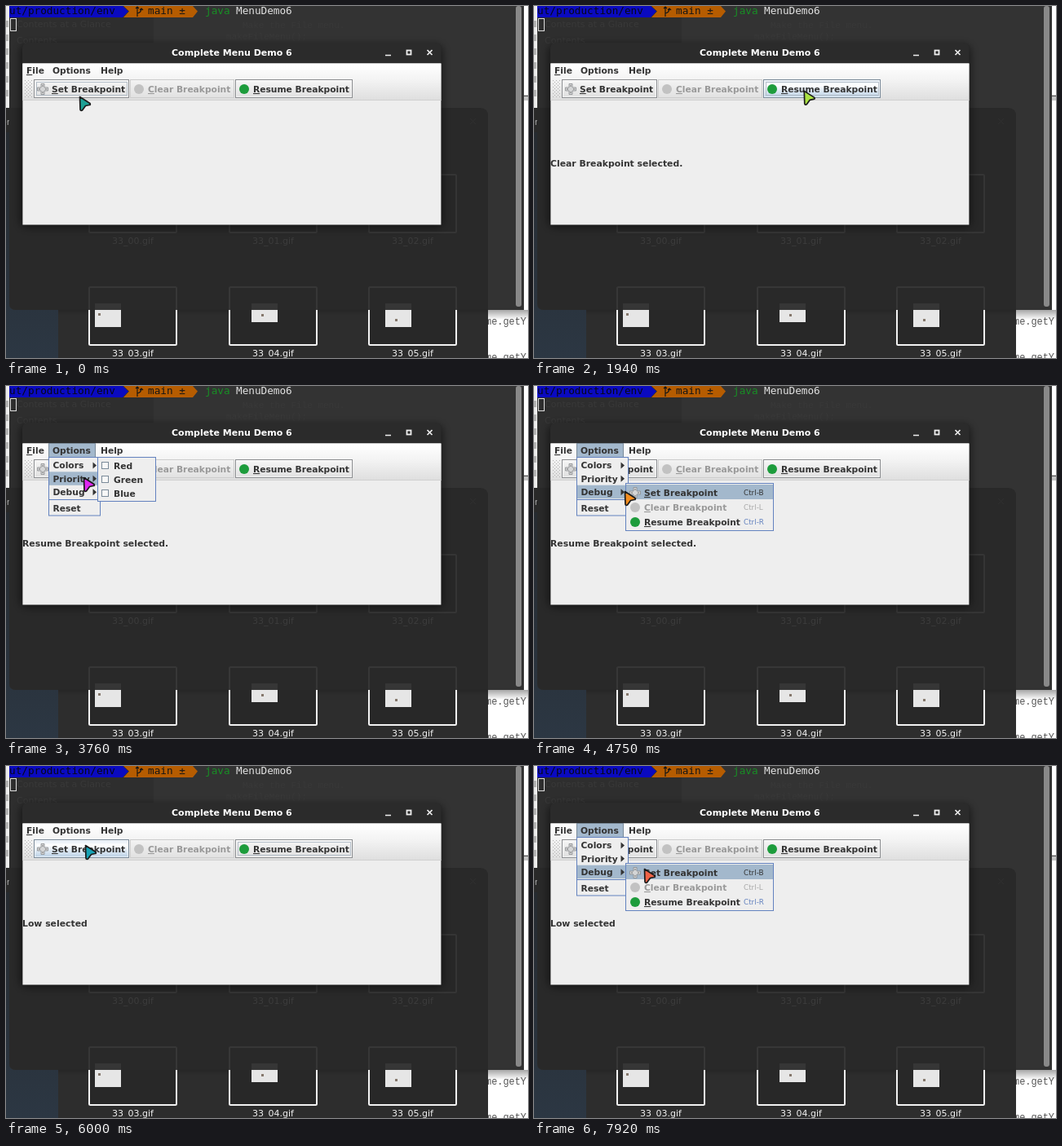
An HTML page that plays this animation: 640x432 px, repeating every 8000 ms.

```html
<!DOCTYPE html>
<html lang="en">
<head>
<meta charset="utf-8">
<title>Menu demo</title>
<style>
html, body { margin: 0; width: 100%; height: 100%; overflow: hidden; background: #fff; }
svg { display: block; width: 640px; height: 432px; }
text { white-space: pre; }
.ui { font: bold 10.7px "DejaVu Sans", sans-serif; fill: #333; }
.ui .off { fill: #999; }
.ui .message { font-size: 10.85px; }
.mnemonic { text-decoration: underline; }
.key { font: 8.8px "DejaVu Sans", sans-serif; }
.file { font: 11px "DejaVu Sans", sans-serif; text-anchor: middle; }
.term { font: 12.7px "DejaVu Sans Mono", monospace; }
.code { font: 11.9px "Liberation Mono", monospace; }
.ghost { fill: #393939; font-size: 11px; text-anchor: start; }
.popup { fill: #eee; stroke: #6382bf; }
.chosen { fill: #a3b8cc; }
</style>
</head>
<body>
<svg viewBox="0 0 640 432" xmlns="http://www.w3.org/2000/svg">
  <defs>
    <linearGradient id="bar" x2="0" y2="1"><stop stop-color="#fff"/><stop offset=".45" stop-color="#f3f3f3"/><stop offset="1" stop-color="#dedede"/></linearGradient>
    <linearGradient id="plain" x2="0" y2="1"><stop stop-color="#f6f6f6"/><stop offset="1" stop-color="#e0e0e0"/></linearGradient>
    <linearGradient id="hover" x2="0" y2="1"><stop stop-color="#dde8f3"/><stop offset=".3" stop-color="#fff"/><stop offset="1" stop-color="#b8cfe5"/></linearGradient>
    <linearGradient id="desk" x2="0" y2="1"><stop stop-color="#25292e"/><stop offset="1" stop-color="#2c3743"/></linearGradient>
    <linearGradient id="edge" x2="0" y2="1"><stop stop-color="#000" stop-opacity=".35"/><stop offset="1" stop-color="#000" stop-opacity="0"/></linearGradient>
    <pattern id="grip" width="4" height="4" x="23" y="91" patternUnits="userSpaceOnUse">
      <path d="M0 0h1v1h-1zM2 2h1v1h-1z" fill="#b0b0b0"/>
    </pattern>
    <filter id="soft" x="-10%" y="-20%" width="120%" height="140%"><feGaussianBlur stdDeviation="5"/></filter>
  </defs>
  <g id="back"></g>
  <g id="app" class="ui"></g>
  <path id="pointer" d="M.5 .5L13 8.500Q14 10.500 12 10.500L7.500 11.500L3.500 17Q1.500 18 1 16Z" stroke="#1b1b1b" stroke-width="1.700" stroke-linejoin="round"/>
</svg>
<script>
const LOOP = 8000, STEP = 80;
const byId = id => document.getElementById(id);

const rect = (x, y, w, h, attrs = "") =>
  `<rect x="${x}" y="${y}" width="${w}" height="${h}" ${attrs}/>`;
const text = (x, y, str, attrs = "") => `<text x="${x}" y="${y}" ${attrs}>${str}</text>`;
const mnemonic = str => `<tspan class="mnemonic">${str[0]}</tspan>${str.slice(1)}`;

// Desktop, file manager and terminal
function thumbnail(x, y, name, color, textColor, fill) {
  return rect(x + 1, y + 1, 107, 71, `rx="1.5" fill="${fill}" stroke="${color}" stroke-width="2"`) +
    text(x + 54.5, y + 86, name, `class="file" fill="${textColor}"`);
}

function backdrop() {
  let s = rect(0, 0, 640, 432, 'fill="#fff"') +
    rect(0, 0, 5, 125, 'fill="#ededed"');
  for (let y = 18; y < 118; y += 17) s += rect(0, y, 3, 8, 'fill="#b5b5b5"');
  s += rect(0, 125, 66, 307, 'fill="url(#desk)"') +
    rect(0, 125, 6, 30, 'fill="#292929"') +
    text(-6, 146, "er", 'class="file" fill="#aaa" style="text-anchor:start"') +
    rect(634, 109, 6, 7, 'fill="#c4c4c4"') + rect(634, 110, 6, 1, 'fill="#555"') +
    text(588, 391, "me.getY", 'class="code" fill="#555"') +
    text(588, 435, "me.getY", 'class="code" fill="#555"') +
    rect(591, 373, 49, 12, 'fill="url(#edge)"') +
    rect(64, 360, 527, 72, 'fill="#2d2d2d"') +
    '<path d="M4 0H635V373H12Q4 373 4 365Z" fill="#333"/>' +
    rect(4, 0, 177, 126, 'fill="#2e2e2e"') +
    '<path d="M4 125H581Q591 125 591 135V373H12Q4 373 4 365Z" fill="#292929"/>' +
    rect(64, 372, 527, 8, 'fill="url(#edge)" opacity=".5"') +
    rect(625, 0, 7, 369, 'rx="3" fill="#898989"') +
    text(13, 26, "Contents at a Glance", 'class="file ghost"') +
    text(13, 46, "Contents", 'class="file ghost"') +
    text(290, 27, "Make the File menu.", 'class="code ghost"') +
    text(270, 41, "makeFileMenu();", 'class="code ghost"') +
    '<path d="M569 138l7 7m0-7l-7 7" stroke="#2f2f2f"/>';

  const columns = [101, 273, 444];
  const insets = [[8, 394], [28, 388], [21, 394]];
  columns.forEach((x, i) => {
    s += thumbnail(x, 206, `33_0${i}.gif`, "#353535", "#3c3c3c", "#272727");
    s += thumbnail(x, 344, `33_0${i + 3}.gif`, "#f2f2f2", "#f0f0f0", "#282828");
    const [dx, bottom] = insets[i];
    s += rect(x + dx, 365, 32, bottom - 365, 'fill="#e6e6e6"') +
      rect(x + dx + (i ? 12 : 4), bottom - (i ? 10 : 17), 3, 3, 'fill="#85786c"');
  });
  // The terminal lies over the upper part of the lower thumbnails
  s += rect(64, 343, 527, 30, 'fill="#292929" opacity=".93"');

  return s + '<path d="M4 0H143L150 6.5L143 14H4Z" fill="#0a0ac0"/>' +
    '<path d="M144 0H229L235 6.5L229 14H144L151 6.5Z" fill="#b65c00"/>' +
    '<path d="M161 13V1M161 9Q166 8 166 3M159 3l2-2 2 2M164 5l2-2 2 2" fill="none" stroke="#161616" stroke-width="1.2"/>' +
    text(4, 10, "ut/production/env", 'class="term" fill="#080816"') +
    text(174, 10, "main ±", 'class="term" fill="#161616"') +
    text(244, 10, "java", 'class="term" fill="#188f25"') +
    text(282, 10, "MenuDemo6", 'class="term" fill="#e2e2e2"') +
    rect(5.5, 15.5, 7, 15, 'fill="none" stroke="#ddd"');
}

// Application window
const dot = (x, y, on) => `<circle cx="${x}" cy="${y}" r="6" fill="${on ? "#1d9c3c" : "#c2c2c2"}"/>`;
const pad = (x, y, on) =>
  `<g transform="translate(${x} ${y})"><path d="M-2-6.5h4v4.5h4.500v4h-4.500v4.500h-4v-4.500h-4.500v-4h4.500z" ` +
  `fill="${on ? "#d4d5d6" : "#d8d8d8"}" stroke="${on ? "#8a8c8f" : "#c8c8c8"}" stroke-width=".8"/>` +
  `<path d="M-1-4h2M-1 4h2M-4-1v2M4-1v2" stroke="${on ? "#777" : "#c2c2c2"}"/></g>`;

const tools = [
  { name: "Set Breakpoint", x: 34, w: 117, icon: pad, key: "B" },
  { name: "Clear Breakpoint", x: 152, w: 128, icon: dot, key: "L" },
  { name: "Resume Breakpoint", x: 281, w: 144, icon: dot, key: "R" }
];

function toolButton({ name, x, w, icon }, on, hovered, focused) {
  const fill = hovered && on ? "url(#hover)" : on ? "url(#plain)" : "none";
  const border = !on ? "#ccc" : hovered ? "#7a8a99" : "#8b8d90";
  return rect(x + .5, 90.5, w - 1, 22, `fill="${fill}" stroke="${border}"`) +
    (on ? rect(x + 1.5, 91.5, w - 3, 20, 'fill="none" stroke="#fff" opacity=".6"') : "") +
    (focused ? rect(x + 3.5, 93.5, w - 6, 16, 'fill="none" stroke="#b4bec8"') : "") +
    icon(x + 11, 102, on) +
    text(x + 22, 106, mnemonic(name), on ? "" : 'class="off"');
}

const popup = (x, y, w, h) => rect(x + .5, y + .5, w - 1, h - 1, 'class="popup"');
const chosen = (x, y, w, h) => rect(x, y, w, h, 'class="chosen"');

function optionsMenu(active) {
  let s = popup(52, 87, 64, 72.5);
  ["Colors", "Priority", "Debug"].forEach((name, i) => {
    const y = 89.4 + i * 16.4;
    if (name === active) s += chosen(53, y - .5, 62, 16.5);
    s += text(57.5, y + 12, name) + `<path d="M106.500 ${y + 4}l4.500 4-4.500 4z" fill="#333"/>`;
  });
  return s + rect(53, 139, 62, 1, 'fill="#6382bf"') + text(57.5, 154, "Reset");
}

function choiceMenu(y, names, item, round) {
  let s = popup(112, y, 72, names.length * 17 + 4);
  names.forEach((name, i) => {
    const top = y + 2 + i * 17;
    if (name === item) s += chosen(113, top, 70, 17);
    s += rect(117.5, top + 4.5, 8, 8, `rx="${round ? 4 : 0}" fill="#f7f7f7" stroke="#7a8a99"`) +
      text(132, top + 12.5, name);
  });
  return s;
}

function debugMenu(item, enabled) {
  let s = popup(112, 119, 182, 59);
  tools.forEach(({ name, icon, key }, i) => {
    const y = 131 + i * 18, on = enabled[i], lit = name === item;
    if (lit) s += chosen(113, 121, 180, 18);
    s += icon(124, y, on) + text(135, y + 4, mnemonic(name), on ? "" : 'class="off"') +
      text(257, y + 3, "Ctrl-" + key, `class="key" fill="${!on ? "#aaa" : lit ? "#333" : "#6382bf"}"`);
  });
  return s;
}

const submenus = {
  Colors: item => choiceMenu(87, ["Red", "Green", "Blue"], item, false),
  Priority: item => choiceMenu(103, ["High", "Low"], item, true),
  Debug: debugMenu
};

const frame =
  rect(17, 47, 519, 225, 'rx="9" fill="#000" opacity=".45" filter="url(#soft)"') +
  '<path d="M20 71V53Q20 45 28 45H525Q533.500 45 533.500 53V71Z" fill="#2b2b2b"/>' +
  text(203, 61, "Complete Menu Demo 6", 'fill="#fff" style="font-size:11px"') +
  '<path d="M465 60.500h7M516.500 54l6 6m0-6l-6 6" stroke="#eee" stroke-width="1.700"/>' +
  rect(491.5, 54.5, 5, 5, 'fill="none" stroke="#eee" stroke-width="1.800"') +
  rect(20.4, 70.5, 513, 198, 'fill="#eee"') +
  rect(20.4, 70.5, 513, 45.5, 'fill="url(#bar)"') +
  rect(20.4, 115, 513, 1, 'fill="#d0d0d0"') +
  rect(23, 91, 9, 22, 'fill="url(#grip)"');

// Timelines: [time, value...]
const path = [
  [0, 90, 111], [80, 90, 111], [320, 90, 104], [640, 96, 104], [1040, 190, 105], [1360, 195, 104],
  [1840, 330, 104], [2160, 335, 103], [2640, 100, 78], [2880, 90, 67], [3200, 88, 96],
  [3520, 150, 98], [3760, 95, 112], [4080, 140, 115], [4320, 98, 128], [4720, 111, 129],
  [4960, 100, 112], [5280, 140, 129], [5440, 140, 129], [6000, 97, 97], [6240, 97, 100],
  [6640, 82, 76], [6960, 90, 100], [7200, 108, 136], [7920, 135, 126]
];
// hue, saturation, lightness
const tints = [[0, 175, 70, 37], [1040, 327, 63, 59], [2880, 570, 87, 56], [4720, 751, 90, 54],
  [6000, 907, 77, 40], [7200, 1072, 75, 63], [7920, 1090, 85, 61]];
const messages = [[0, ""], [320, "Set Breakpoint selected."], [1280, "Clear Breakpoint selected."],
  [2080, "Resume Breakpoint selected."], [5440, "Low selected"]];
const focus = [[0, 0], [320, 1], [1280, 2]];
// open, highlighted entry, open submenu, highlighted item
const menus = [
  [0, false], [2800, true], [3120, true, "Colors"], [3280, true, "Colors", "Colors"],
  [3680, true, "Priority", "Colors"], [3840, true, "Priority", "Priority"],
  [4000, true, "Priority", "Priority", "High"], [4240, true, "Debug", "Priority"],
  [4400, true, "Debug", "Debug"], [4640, true, "Debug", "Debug", "Set Breakpoint"],
  [4880, true, "Priority", "Debug"], [5040, true, "Priority", "Priority"],
  [5200, true, "Priority", "Priority", "Low"], [5440, false],
  [6640, true], [6880, true, "Colors"], [7040, true, "Priority"], [7120, true, "Debug"],
  [7280, true, "Debug", "Debug"], [7600, true, "Debug", "Debug", "Set Breakpoint"]
];

const indexAt = (track, t) => track.findLastIndex(key => key[0] <= t);
const at = (track, t) => track[indexAt(track, t)].slice(1);

function tween(track, t) {
  const i = indexAt(track, t), a = track[i], b = track[i + 1] || a;
  const p = b === a ? 0 : (t - a[0]) / (b[0] - a[0]);
  const eased = p * p * (3 - 2 * p);
  return a.slice(1).map((v, k) => v + (b[k + 1] - v) * eased);
}

function render(t) {
  const [x, y] = tween(path, t);
  const [open, entry, sub, item] = at(menus, t);
  const cleared = t < 320 || t >= 1280;
  const enabled = [cleared, !cleared, true];
  const [focused] = at(focus, t);

  let s = frame;
  if (open) s += rect(52.5, 70.5, 57, 17, 'fill="#a3b8cc" stroke="#7a8a99"');
  s += text(25, 83, mnemonic("File")) + text(57, 83, "Options") + text(116, 83, "Help");
  tools.forEach((tool, i) => {
    const hovered = !open && y > 90 && y < 111 && x > tool.x && x < tool.x + tool.w;
    s += toolButton(tool, enabled[i], hovered, !open && focused === i);
  });
  s += text(20, 197, at(messages, t)[0], 'class="message"');
  if (open) s += optionsMenu(entry);
  if (sub) s += submenus[sub](item, enabled);
  byId("app").innerHTML = s;

  const pointer = byId("pointer");
  const [hue, saturation, lightness] = tween(tints, t);
  pointer.setAttribute("transform", `translate(${x} ${y})`);
  pointer.setAttribute("fill", `hsl(${hue % 360} ${saturation}% ${lightness}%)`);
}

byId("back").innerHTML = backdrop();
const start = performance.now();
let shown = -1;
function tick() {
  const t = Math.floor((performance.now() - start) % LOOP / STEP) * STEP;
  if (t !== shown) render(shown = t);
  requestAnimationFrame(tick);
}
tick();
</script>
</body>
</html>
```
